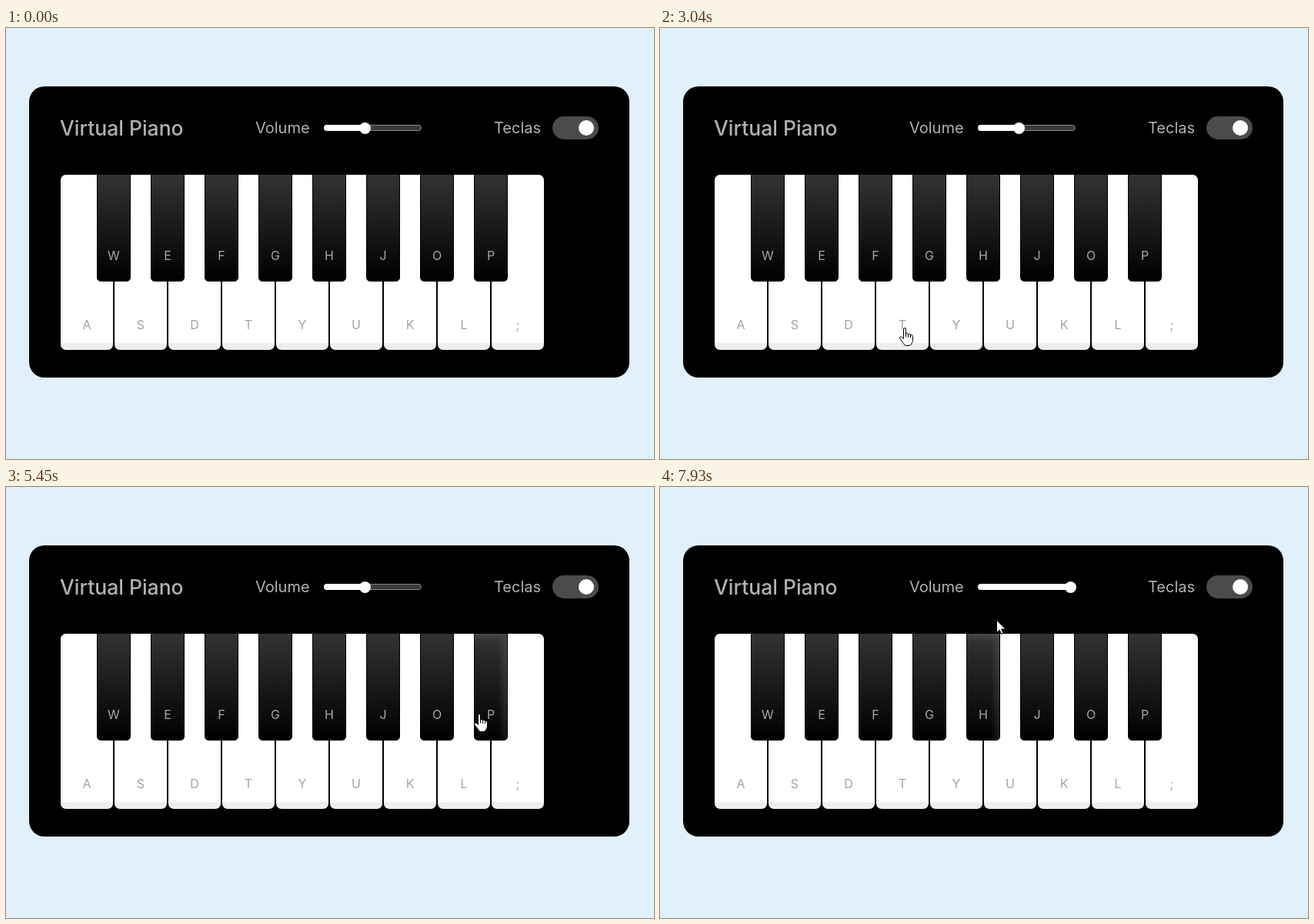
An HTML page that plays this animation: 842x561 px, repeating every 8 s.

```html
<!DOCTYPE html>
<html lang="es">
<head>
<meta charset="utf-8">
<title>Virtual Piano</title>
<style>
  html, body { margin: 0; width: 100%; height: 100%; overflow: hidden; background: #e1f1fc; }
  body { position: relative; font-family: Inter, "Open Sans", sans-serif; color: #b2b2b2; }
  body * { position: absolute; box-sizing: border-box; }
  .card { left: 30px; top: 76px; width: 780px; height: 379px; border-radius: 20px; background: #000; }
  .text { font-size: 20px; line-height: 30px; top: 115px; white-space: nowrap; }
  .title { left: 70px; font-size: 26.5px; font-weight: 500; }
  .track { left: 413px; top: 126px; width: 127px; height: 8px; border: 1px solid #858585; border-radius: 4px; background: #3b3b3b; }
  .fill { left: 413px; top: 126px; height: 8px; border-radius: 4px; background: #fff; }
  .thumb { top: 122.5px; width: 15px; height: 15px; border-radius: 50%; background: #fff; }
  .toggle { left: 710px; top: 115px; width: 60px; height: 30px; border-radius: 15px; background: #4b4b4b; }
  .knob { left: 34px; top: 5px; width: 20px; height: 20px; border-radius: 50%; background: #fff; }
  .key { top: 190px; border: 1px solid #000; font-size: 16px; text-align: center; }
  .key span { left: 0; width: 100%; line-height: 20px; }
  .white { width: 70px; height: 230px; border-radius: 8px; color: #a0a4a4; background: linear-gradient(#fff 96%, #eee 96%); }
  .white span { top: 185px; }
  .white.active { box-shadow: inset -5px 5px 20px rgba(0, 0, 0, .2); }
  .black { width: 44px; height: 140px; border-radius: 0 0 5px 5px; color: #a8a8a8; background: linear-gradient(#333, #000); }
  .black span { top: 95px; }
  .black.active { box-shadow: inset -5px 5px 10px rgba(255, 255, 255, .12); }
  svg { left: 0; top: 0; width: 20px; height: 26px; overflow: visible; }
  path { fill: #fff; stroke: #000; stroke-linejoin: round; stroke-linecap: round; }
</style>
</head>
<body>
<div class="card"></div>
<div class="text title">Virtual Piano</div>
<div class="text" style="left:324px">Volume</div>
<div class="track"></div><div class="fill"></div><div class="thumb"></div>
<div class="text" style="left:634px">Teclas</div>
<div class="toggle"><div class="knob"></div></div>
<div id="keys"></div>
<svg id="arrow"><path d="M.5.5V16.5L4.2 13 6.6 18.5 9 17.5 6.7 12H11.7Z"/></svg>
<svg id="hand">
  <path d="M.5 14V2Q.5.5 2 .5T3.5 2V8Q5 6.7 6.5 8.6 8.4 7.6 9.5 9.4 12.5 8.8 12.5 11.5V16Q12.5 18.5 11 20.5 10.5 23.5 7 23.5H4Q1.3 23.5.5 20.5L-3.8 15Q-5.2 12.8-3.5 12-2.2 11.6-.8 13.2Z"/>
  <path d="M3.5 8V12M6.5 8.8V12.5M9.5 9.6V12.8" style="fill:none"/>
</svg>
<script>
const LOOP = 8000;
const keys = {};

function addKeys(letters, type, firstX) {
  [...letters].forEach((letter, i) => {
    const key = document.createElement('div');
    key.className = 'key ' + type;
    key.style.left = firstX + 70 * i + 'px';
    key.innerHTML = `<span>${letter}</span>`;
    document.getElementById('keys').append(key);
    keys[letter] = key;
  });
}
addKeys('ASDTYUKL;', 'white', 70);
addKeys('WEFGHJOP', 'black', 118);

// [time, x, y] of the pointer tip
const pointerPath = [
  [130, 517, 520], [620, 141, 360], [770, 122, 368], [1000, 106, 374], [1350, 106, 374],
  [1490, 139, 378], [2300, 218, 384], [2700, 268, 402], [3040, 316, 390], [3300, 335, 385],
  [4070, 485, 377], [4900, 646, 375], [5130, 664, 365], [5450, 613, 295], [5730, 528, 355],
  [5850, 518, 300], [6050, 466, 130], [6100, 466, 130], [6400, 533, 130], [6550, 480, 150],
  [6690, 424, 176], [7000, 375, 360], [7380, 240, 365], [7650, 345, 360], [7850, 446, 250],
  [7930, 437, 173]
];
const volumePath = [[6100, 466], [6400, 533]];
// [key, pressed, released]
const presses = [
  ['A', 1200, 1420], ['S', 1490, 1690], ['D', 2430, 2630], ['T', 3230, 3430],
  ['Y', 3580, 3780], ['U', 3930, 4140], ['K', 4280, 4480], ['L', 4630, 4830],
  [';', 4970, 5170], ['P', 5380, 5590], ['K', 5660, 5800], ['Y', 6980, 7120],
  ['T', 7160, 7300], ['D', 7340, 7490], ['T', 7540, 7680], ['Y', 7690, 7830],
  ['H', 7850, 8000]
];

function at(path, t) {
  if (t <= path[0][0]) return path[0].slice(1);
  const i = path.findIndex(p => p[0] > t);
  if (i < 0) return path.at(-1).slice(1);
  const [a, b] = [path[i - 1], path[i]];
  const k = (t - a[0]) / (b[0] - a[0]);
  return a.slice(1).map((v, j) => v + (b[j + 1] - v) * k);
}

const arrow = document.getElementById('arrow');
const hand = document.getElementById('hand');
const fill = document.querySelector('.fill');
const thumb = document.querySelector('.thumb');

function draw(now) {
  const t = now % LOOP;
  for (const letter in keys) {
    keys[letter].classList.toggle('active',
      presses.some(([k, from, to]) => k === letter && t >= from && t < to));
  }

  const [volume] = at(volumePath, t);
  fill.style.width = volume - 413 + 'px';
  thumb.style.left = volume - 7.5 + 'px';

  const [x, y] = at(pointerPath, t).map(Math.round);
  const onKeys = x > 70 && x < 700 && y > 190 && y < 420;
  const shown = t >= 130;
  arrow.style.display = shown && !onKeys ? 'block' : 'none';
  hand.style.display = shown && onKeys ? 'block' : 'none';
  arrow.style.transform = hand.style.transform = `translate(${x}px, ${y}px)`;
  requestAnimationFrame(draw);
}
const start = performance.now();
requestAnimationFrame(function first() { drawLoop(); });
function drawLoop() { draw(performance.now() - start); }
</script>
</body>
</html>
```
